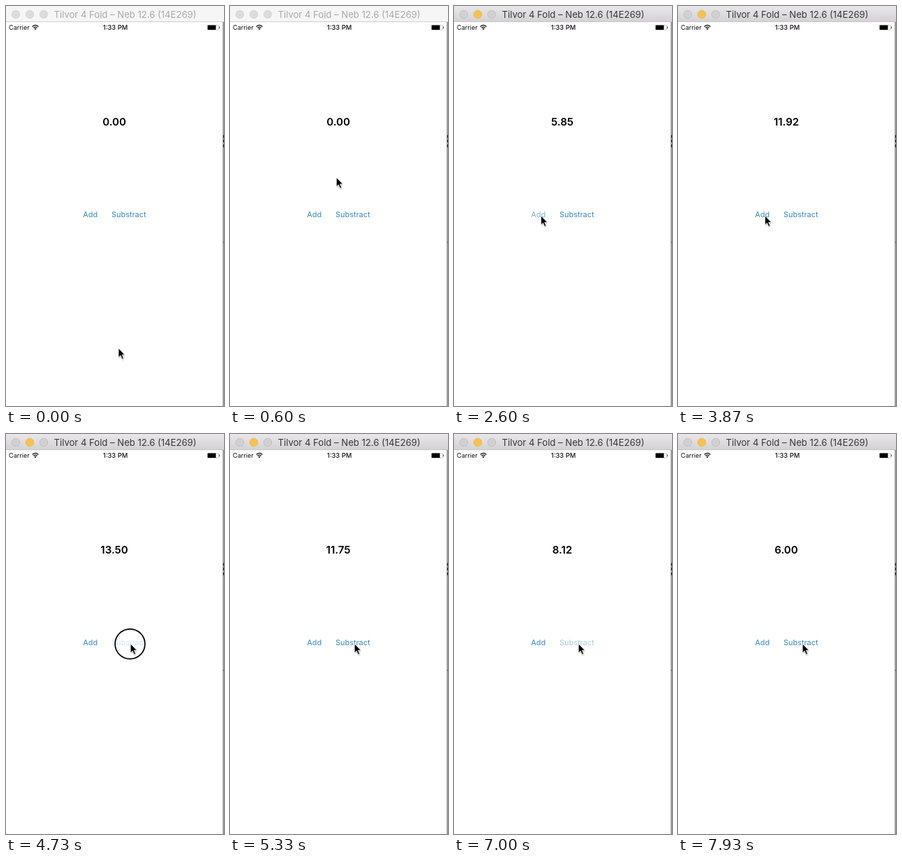
Animation, 312 px wide and 572 px high, one loop 8 s. Source, as an HTML page:

```html
<!DOCTYPE html>
<html lang="en">
<head>
<meta charset="utf-8">
<title>Counter demo</title>
<style>
  html, body { margin: 0; width: 100%; height: 100%; overflow: hidden; background: #fff; }
  svg { display: block; width: 100%; height: 100%; }
  text { font-family: Inter, Roboto, sans-serif; }
</style>
</head>
<body>
<svg viewBox="0 0 312 572" xmlns="http://www.w3.org/2000/svg">
  <defs>
    <linearGradient id="chrome" x1="0" y1="0" x2="0" y2="1">
      <stop offset="0" stop-color="#e9e7e9"/>
      <stop offset="1" stop-color="#d3d1d3"/>
    </linearGradient>
    <filter id="soft" x="-50%" y="-50%" width="200%" height="200%">
      <feGaussianBlur stdDeviation="1.2"/>
    </filter>
  </defs>
  <rect width="312" height="572" fill="#fff"/>

  <rect id="bar" width="312" height="23"/>
  <path d="M0 22.5H312" stroke="#c4c4c4" stroke-width=".8"/>
  <g stroke-width=".8">
    <circle class="light" cx="14" cy="12" r="5.7"/>
    <circle class="light" id="yellow" cx="34" cy="12" r="5.7"/>
    <circle class="light" cx="54" cy="12" r="5.7"/>
  </g>
  <text id="title" x="170.5" y="17" font-size="13.1" text-anchor="middle">Tilvor 4 Fold – Neb 12.6 (14E269)</text>

  <text x="4" y="34" font-size="9.1" fill="#111">Carrier</text>
  <g fill="none" stroke="#111" stroke-width="1.3">
    <path d="M37.6 29.4Q42 25.4 46.4 29.4"/>
    <path d="M39.3 31.3Q42 28.9 44.7 31.3"/>
  </g>
  <path d="M40.4 32.4Q42 31 43.6 32.4L42 34.2Z" fill="#111"/>
  <text x="156.5" y="34" font-size="9.3" font-weight="500" text-anchor="middle" fill="#111">1:33 PM</text>
  <rect x="288.3" y="27.3" width="16" height="7" rx="1.2" fill="none" stroke="#aaa" stroke-width=".6"/>
  <rect x="288.6" y="27.6" width="11.8" height="6.4" rx=".6" fill="#000"/>
  <path d="M305.4 29.3v3" stroke="#555" stroke-width="1"/>

  <path d="M311 23V572" stroke="#6a6a6a" stroke-width="1.3"/>
  <path d="M311.4 184.5v4M311.4 191v4M311.4 198v4" stroke="#222" stroke-width="1.3"/>
  <path d="M311 338h1" stroke="#222" stroke-width="1"/>

  <text id="total" x="155" y="171" font-size="15" font-weight="600" text-anchor="middle" fill="#000"></text>
  <g font-size="10.9" fill="#3a88c2" text-anchor="middle">
    <text id="add" x="120.7" y="302.3">Add</text>
    <text id="sub" x="175.8" y="302.3">Substract</text>
  </g>

  <circle id="ring" r="21.4" fill="none" stroke="#000" stroke-width="1.7"/>
  <g id="cursor">
    <path d="M0 0V14.5L3.4 11.6L6 17.4L8.4 16.3L5.8 10.6H10.4Z" transform="translate(.6 1.8)" fill="#000" opacity=".3" filter="url(#soft)"/>
    <path d="M0 0V14.5L3.4 11.6L6 17.4L8.4 16.3L5.8 10.6H10.4Z" fill="#000" stroke="#fff" stroke-width=".8"/>
  </g>
</svg>
<script>
const $ = id => document.getElementById(id);
const LOOP = 8000, TICK = 1000 / 15, STEPS = 20;

// Times are in ticks; the counter makes two steps per tick.
const clicks = [
  { down: 14, up: 16, lag: 29, by: 4.5, button: "add" },
  { down: 35, up: 37, lag: 72, by: 4.5, button: "add" },
  { down: 51, up: 53, lag: 103, by: 4.5, button: "add" },
  { down: 71, up: 73, lag: 146, by: -2.5, button: "sub" },
  { down: 87, up: 89, lag: 176, by: -2.5, button: "sub" },
  { down: 104, up: 105, lag: 207, by: -2.5, button: "sub" }
];

const clamp = x => Math.max(0, Math.min(1, x));
const ease = x => x * x * (3 - 2 * x);
const bezier = (a, b, c, d, t) => {
  const s = 1 - t;
  return s * s * s * a + 3 * s * s * t * b + 3 * s * t * t * c + t * t * t * d;
};

function pointer(k) {
  if (k < 63) {
    const t = ease(clamp(k / 13));
    return [bezier(161, 200, 170, 124.5, t), bezier(489.5, 300, 160, 300, t)];
  }
  return [124.5 + 53.7 * ease(clamp((k - 63) / 7)), 300];
}

function setWindow(active) {
  $("bar").setAttribute("fill", active ? "url(#chrome)" : "#f6f6f6");
  $("title").setAttribute("fill", active ? "#383838" : "#a9a9a9");
  for (const light of document.querySelectorAll(".light")) {
    const lit = active && light.id === "yellow";
    light.setAttribute("fill", lit ? "#f8c14e" : active ? "#d2d0d2" : "#dcdcdc");
    light.setAttribute("stroke", lit ? "#e6b452" : active ? "#bdbbbd" : "#d0d0d0");
  }
}

function draw(ms) {
  const k = Math.floor((ms + 5) / TICK);
  const alpha = { add: 1, sub: 1 };
  let total = 0, pressed = false;

  for (const c of clicks) {
    if (k < c.down) break;
    let step = Math.max(0, 2 * k - c.lag);
    if (step >= STEPS - 1) step = STEPS;
    total += c.by * step / STEPS;
    const held = k < c.up;
    pressed = pressed || held;
    alpha[c.button] = held ? 0.22 : 0.22 + 0.78 * clamp(step / 11);
  }

  setWindow(k >= clicks[0].down);
  // The tiny offset makes halves round down.
  $("total").textContent = Math.max(0, total - 1e-6).toFixed(2);
  $("add").setAttribute("opacity", alpha.add);
  $("sub").setAttribute("opacity", alpha.sub);

  const [x, y] = pointer(k);
  const ring = $("ring");
  ring.setAttribute("visibility", pressed ? "visible" : "hidden");
  ring.setAttribute("cx", x - 0.7);
  ring.setAttribute("cy", y + 0.3);
  $("cursor").setAttribute("transform", `translate(${x} ${y}) scale(.88)`);
}

const start = performance.now();
function play() {
  draw((performance.now() - start) % LOOP);
  requestAnimationFrame(play);
}
play();
</script>
</body>
</html>
```
